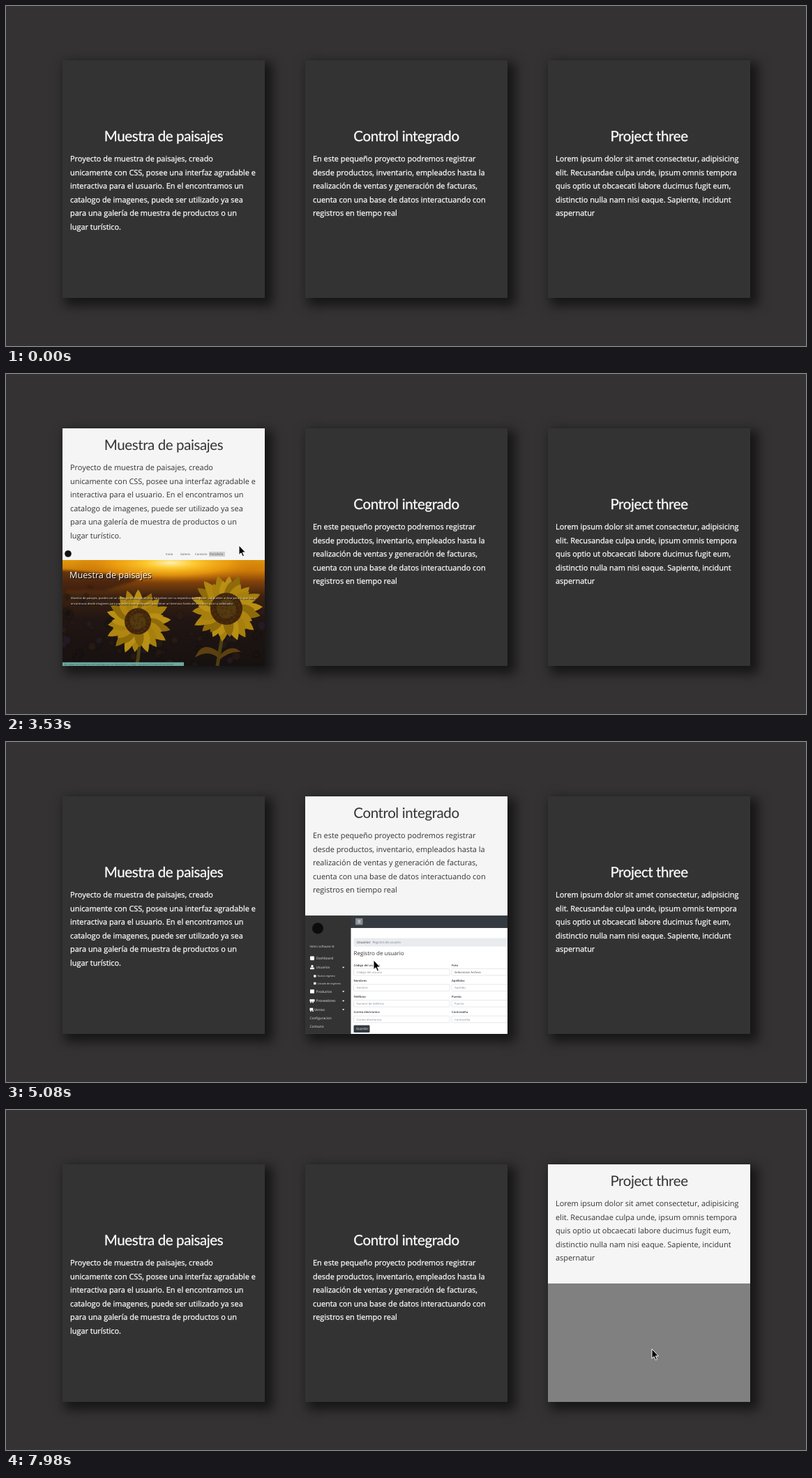
Recreate the animation shown at these times as an HTML page. Size 1147 by 488 pixels, loop 8 s.

```html
<!DOCTYPE html>
<html lang="es">
<head>
<meta charset="utf-8">
<title>Tarjetas de proyectos</title>
<style>
  html, body { margin: 0; width: 100%; height: 100%; overflow: hidden; background: #343233; }
  body { position: relative; text-rendering: geometricPrecision; }
  .card { position: absolute; top: 78px; width: 290px; height: 341px; background: #333; box-shadow: 7px 7px 15px 4px rgba(0,0,0,.58); }
  .face { position: absolute; left: 0; width: 290px; overflow: hidden; }
  .shot { top: 86px; height: 170px; }
  .info { top: 85px; height: 171px; }
  .shot svg { display: block; }
  h2 { position: absolute; left: 0; top: 10px; width: 100%; margin: 0; text-align: center;
       font: 400 20.5px/28px Lato, sans-serif; letter-spacing: -.4px; white-space: nowrap; }
  p { position: absolute; left: 11px; top: 47px; margin: 0; white-space: pre;
      font: 400 10.92px/19.6px "Open Sans", "Noto Sans", sans-serif; }
  svg text { font-family: "Open Sans", "Noto Sans", sans-serif; }
  #cursor { position: absolute; left: 0; top: 0; overflow: visible; }
</style>
</head>
<body>
<svg id="cursor" width="12" height="18">
  <path d="M0 0V13.6L3.1 10.8L5.3 15.8L7.5 14.8L5.3 10H9.5Z" fill="#000" stroke="#fff" stroke-width="1" stroke-linejoin="round"/>
</svg>
<script>
const LOOP = 8000, FIRST = 820, STEP = 77.38, SLIDE = 400, SHIFT = 85;

const cards = [
  { x: 81, open: 1388, close: 4310, shot: flowers, title: 'Muestra de paisajes',
    text: ['Proyecto de muestra de paisajes, creado',
           'unicamente con CSS, posee una interfaz agradable e',
           'interactiva para el usuario. En el encontramos un',
           'catalogo de imagenes, puede ser utilizado ya sea',
           'para una galería de muestra de productos o un',
           'lugar turístico.'] },
  { x: 429, open: 4688, close: 6901, shot: dashboard, title: 'Control integrado',
    text: ['En este pequeño proyecto podremos registrar',
           'desde productos, inventario, empleados hasta la',
           'realización de ventas y generación de facturas,',
           'cuenta con una base de datos interactuando con',
           'registros en tiempo real'] },
  { x: 777, open: 7215, close: LOOP + 1, shot: () => rect(0, 0, 290, 170, '#808080'), title: 'Project three',
    text: ['Lorem ipsum dolor sit amet consectetur, adipisicing',
           'elit. Recusandae culpa unde, ipsum omnis tempora',
           'quis optio ut obcaecati labore ducimus fugit eum,',
           'distinctio nulla nam nisi eaque. Sapiente, incidunt',
           'aspernatur'] }
];

// time, x, y of the pointer tip
const path = [
  [0, 213, 510], [810, 213, 510], [820, 213, 484], [1388, 217, 416], [1516, 217, 381],
  [2440, 325, 234], [2700, 347, 238], [2975, 334, 245], [3140, 334, 245], [3520, 333, 246],
  [3910, 366, 251], [4310, 372, 258], [4688, 440, 310], [5610, 647, 317], [6310, 708, 327],
  [6700, 708, 327], [6901, 720, 330], [7160, 775, 337], [7930, 926, 343], [8000, 926, 343]
];

function rect(x, y, w, h, fill, more = '') {
  return `<rect x="${x}" y="${y}" width="${w}" height="${h}" fill="${fill}" ${more}/>`;
}
function label(x, y, size, fill, str, more = '') {
  return `<text x="${x}" y="${y}" font-size="${size}" fill="${fill}" ${more}>${str}</text>`;
}
function dot(x, y, r, fill, more = '') {
  return `<circle cx="${x}" cy="${y}" r="${r}" fill="${fill}" ${more}/>`;
}
function seeded(seed) {
  return () => (seed = (seed * 16807) % 2147483647) / 2147483647;
}

function sunflower(cx, cy, r, core, rnd) {
  const tones = ['#a67f0d', '#b98f14', '#8f6a0a', '#b08610'];
  let s = '';
  for (let ring = 0; ring < 2; ring++) {
    for (let i = 0; i < 18; i++) {
      const len = r * (ring ? .8 : .88 + rnd() * .16), w = r * .17;
      const turn = i * 20 + ring * 10 + rnd() * 8;
      s += `<path d="M0 0Q${w * 1.7} ${len * .6} 0 ${len}Q${-w * 1.7} ${len * .6} 0 0" ` +
           `fill="${tones[(i + ring) % 4]}" transform="translate(${cx} ${cy}) rotate(${turn})"/>`;
    }
  }
  s += dot(cx, cy, core, '#43270b') + dot(cx, cy, core * .6, '#523810');
  for (let i = 0; i < 70; i++) {
    const a = i * 2.4, d = core * Math.sqrt(i / 70);
    s += dot(cx + d * Math.cos(a), cy + d * Math.sin(a), .7, i % 2 ? '#6a4510' : '#2b1707');
  }
  return s;
}

function flowers() {
  const rnd = seeded(77);
  let s = `<defs>
    <linearGradient id="dusk" x2="0" y2="1">
      <stop offset="0" stop-color="#e39a0c"/><stop offset=".1" stop-color="#cf7c08"/>
      <stop offset=".2" stop-color="#84430a"/><stop offset=".34" stop-color="#3d2210"/>
      <stop offset=".55" stop-color="#211613"/><stop offset="1" stop-color="#161110"/></linearGradient>
    <radialGradient id="sun">
      <stop offset="0" stop-color="#fff0b0"/><stop offset=".25" stop-color="#fcc92e"/>
      <stop offset=".6" stop-color="#f0a010" stop-opacity=".7"/><stop offset="1" stop-color="#b05a08" stop-opacity="0"/></radialGradient>
    <filter id="soft"><feGaussianBlur stdDeviation="1.6"/></filter></defs>`;
  s += rect(0, 18, 290, 152, 'url(#dusk)');
  s += '<ellipse cx="155" cy="22" rx="140" ry="30" fill="url(#sun)"/><g filter="url(#soft)">';
  s += '<path d="M-5 32Q50 34 110 46L60 62H-5Z" fill="#3a1f0c" opacity=".7"/>';
  for (let i = 0; i < 90; i++) {
    const y = 56 + rnd() * 114;
    s += dot(rnd() * 290, y, 1.5 + rnd() * 4, ['#2c1a16', '#110d0c', '#2a1b30', '#33200f'][i % 4], 'opacity=".6"');
  }
  s += '</g><path d="M108 120Q112 150 106 170M232 110Q226 145 222 170" fill="none" stroke="#4c3f10" stroke-width="5"/>';
  s += '<path d="M224 150Q200 132 190 158Q208 146 223 158Q240 136 256 150Q240 148 224 162Z" fill="#5c400e"/>';
  s += sunflower(235, 88, 51, 23, rnd) + sunflower(108, 106, 47, 19, rnd);
  s += rect(0, 0, 290, 18, '#f5f5f5') + dot(8, 9, 4.8, '#111');
  s += rect(210, 6, 23, 7, '#cfcfcf');
  ['Inicio', 'Galeria', 'Contacto', 'Portafolio'].forEach((t, i) => {
    s += label(148 + i * 21, 11.2, 4.2, '#555', t);
  });
  const shade = 'style="text-shadow:1px 1px 1px #000"';
  s += label(10, 43.5, 12.7, '#fff', 'Muestra de paisajes', shade);
  s += label(12, 74, 4.05, '#eee', 'Muestra de paisajes, puedes ver un catalogo de imagenes muy llamativas con su respectiva descripcion. Las puedes utilizar para lo que sea o', shade);
  s += label(12, 81.5, 4.05, '#eee', 'encontraras desde imagenes para portadas hasta wallpapers para tener un hermoso fondo de escritorio para tu ordenador', shade);
  s += rect(0, 164.8, 174, 5.2, '#6fa8a0');
  s += label(2, 168.8, 3.6, '#33615c', 'Ver todas las imagenes del catalogo con su descripcion y elegir una para el fondo de escritorio');
  return s;
}

function dashboard() {
  let s = rect(0, 0, 290, 170, '#fff') + rect(65, 0, 225, 18, '#343a40') + rect(0, 0, 65.5, 170, '#333');
  s += rect(72, 4, 10.5, 9.5, '#8a8d90', 'rx="1"');
  for (let i = 0; i < 3; i++) s += rect(75.2, 6.8 + i * 1.6, 4, .7, '#eee');
  s += dot(18, 18.5, 8, '#0c0c0c');
  s += label(6.5, 46.5, 4.4, '#ddd', 'Velmi software ®');

  // text, baseline, left, icon, caret
  const menu = [
    ['Dashboard', 63.3, 15.5, 1, 0], ['Usuarios', 76.3, 15.5, 1, 1], ['Nuevo registro', 88.5, 17.5, 2, 0],
    ['Listado de registros', 99, 17.5, 2, 0], ['Productos', 111, 15.5, 1, 1], ['Proveedores', 124.3, 15.5, 1, 1],
    ['Ventas', 136.8, 13, 1, 1], ['Configuracion', 149.3, 6.5, 0, 0], ['Contacto', 161.3, 6.5, 0, 0]
  ];
  menu.forEach(([t, y, x, icon, caret], i) => {
    s += label(x, y, icon === 2 ? 3.7 : 4.8, '#e4e4e4', t);
    if (icon === 2) s += rect(12, y - 3.2, 3.6, 3.4, '#eee', 'rx="1"');
    if (icon === 1) s += i % 4 === 0 ? rect(7, y - 4.7, 6, 5.6, '#fff', 'rx=".8"')
      : i === 1 ? dot(10, y - 3.6, 1.7, '#fff') + rect(7, y - 1.7, 6, 2.8, '#fff', 'rx="1.2"')
      : rect(6.5, y - 4, i === 6 ? 4.8 : 7, 3.4, '#fff') + dot(8, y + .3, 1, '#fff') + dot(11, y + .3, 1, '#fff');
    if (caret) s += `<path d="M53 ${y - 2.6}h3.4l-1.7 2z" fill="#fff"/>`;
  });

  s += rect(69.5, 32.5, 221, 12, '#e9ecef', 'rx="1.5"');
  s += label(74, 40.4, 4.5, '#333', 'Usuarios') + label(92.5, 40.4, 4.5, '#7c848b', '/ &#160;Registro de usuario');
  s += label(69.5, 57.2, 8, '#333', 'Registro de usuario');
  const rows = [
    ['Código del usuario', 'Código del usuario', 'Foto', 'Seleccionar Archivo'],
    ['Nombres', 'Nombre', 'Apellidos', 'Apellido'],
    ['Teléfono', 'Numero de teléfono', 'Puesto', 'Puesto'],
    ['Correo electronico', 'Correo electronico', 'Contraseña', 'Contraseña']
  ];
  rows.forEach((row, i) => {
    const y = 72.7 + i * 22.6;
    [69.5, 210].forEach((x, c) => {
      s += label(x, y, 4.2, '#333', row[c * 2], 'font-weight="600"');
      s += rect(x, y + 3.7, 137.5, 9.6, '#fff', 'rx="1" stroke="#d5d9dd" stroke-width=".6"');
      s += label(x + 4, y + 10.1, 4.2, i === 0 && c ? '#444' : '#868c92', row[c * 2 + 1]);
    });
  });
  s += rect(69.5, 157.5, 23, 10.5, '#343a40', 'rx="1.2"') + label(73, 164.3, 4.5, '#eee', 'Guardar');
  return s;
}

const cursor = document.getElementById('cursor');
for (const c of cards) {
  const el = document.createElement('div');
  el.className = 'card';
  el.style.left = c.x + 'px';
  el.innerHTML = `<div class="face shot"><svg width="290" height="170" viewBox="0 0 290 170">${c.shot()}</svg></div>
    <div class="face info"><h2>${c.title}</h2><p>${c.text.join('\n')}</p></div>`;
  document.body.insertBefore(el, cursor);
  c.pic = el.querySelector('.shot');
  c.info = el.querySelector('.info');
}

// CSS "ease": cubic-bezier(.25, .1, .25, 1)
function ease(x) {
  if (x <= 0) return 0;
  if (x >= 1) return 1;
  let lo = 0, hi = 1;
  for (let i = 0; i < 24; i++) {
    const u = (lo + hi) / 2, v = 1 - u;
    if (.75 * v * v * u + .75 * v * u * u + u * u * u < x) lo = u; else hi = u;
  }
  const v = 1 - lo;
  return .3 * v * v * lo + 3 * v * lo * lo + lo * lo * lo;
}
function grey(a, b, p) {
  const n = Math.round(a + (b - a) * p);
  return `rgb(${n},${n},${n})`;
}
function pointer(t) {
  const i = Math.max(1, path.findIndex(k => k[0] > t));
  const [t0, x0, y0] = path[i - 1], [t1, x1, y1] = path[i];
  const u = (t - t0) / (t1 - t0);
  return [Math.round(x0 + (x1 - x0) * u), Math.round(y0 + (y1 - y0) * u)];
}

function draw(now) {
  const raw = now % LOOP;
  const t = raw < FIRST ? 0 : FIRST + Math.floor((raw - FIRST) / STEP) * STEP;
  for (const c of cards) {
    const p = ease((t - c.open) / SLIDE) - ease((t - c.close) / SLIDE);
    c.info.style.transform = `translateY(${-SHIFT * p}px)`;
    c.info.style.background = grey(51, 245, p);
    c.info.style.color = grey(255, 51, p);
    // light text on dark reads heavier
    c.info.style.webkitTextStroke = `${(.25 * (1 - p)).toFixed(3)}px currentColor`;
    c.pic.style.transform = `translateY(${SHIFT * p}px)`;
    c.pic.style.opacity = p;
  }
  const [x, y] = pointer(t);
  cursor.style.transform = `translate(${x}px,${y}px)`;
}

const start = performance.now();
function tick() {
  draw(performance.now() - start);
  requestAnimationFrame(tick);
}
tick();
</script>
</body>
</html>
```
